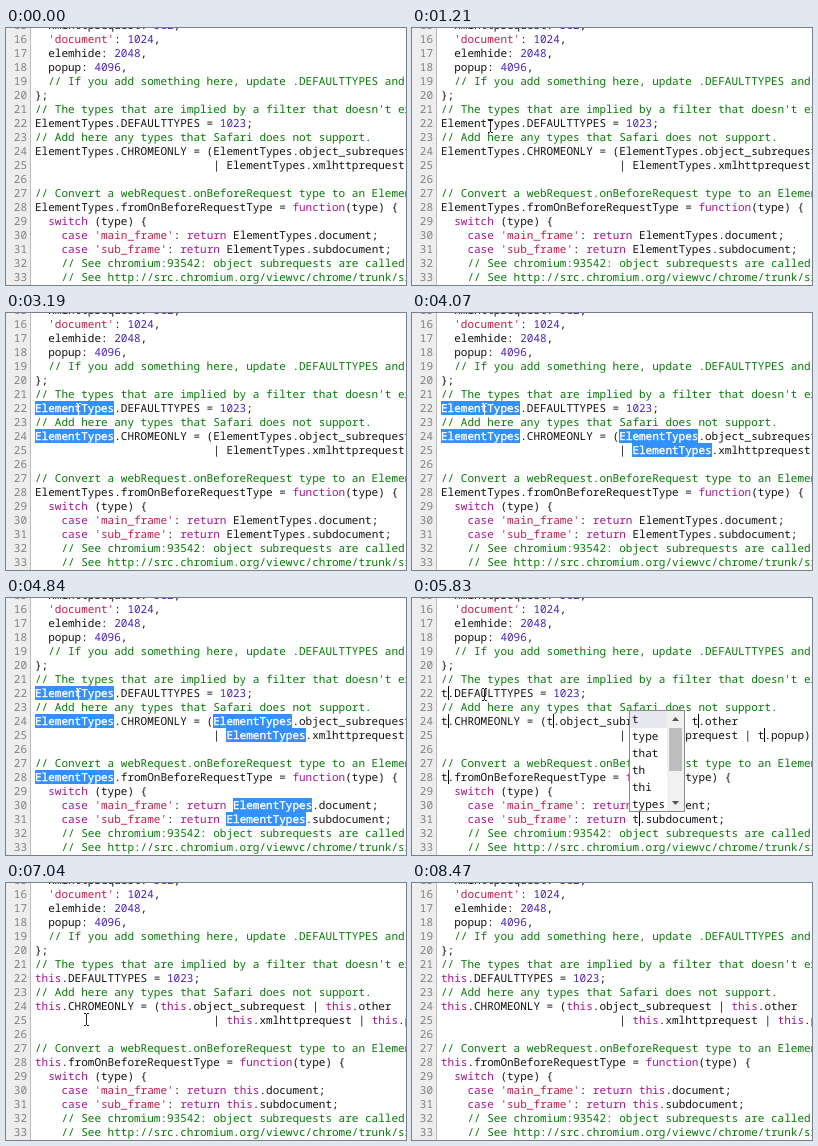
An HTML page that plays this animation: 400 by 257 pixels, repeating every 8580 ms.

```html
<!DOCTYPE html>
<html lang="en">
<head>
<meta charset="utf-8">
<title>Multiple selection in a code editor</title>
<style>
  html, body { margin: 0; width: 100%; height: 100%; overflow: hidden; background: #fff; }
  #stage {
    position: absolute; left: 0; top: 0; width: 400px; height: 257px; overflow: hidden;
    font: 11px/14px "Noto Sans Mono", "DejaVu Sans Mono", monospace;
    font-variant-ligatures: none; text-rendering: geometricPrecision;
    white-space: pre; color: #111;
  }
  #gutter {
    position: absolute; left: 0; top: -9px; width: 21px; height: 270px; padding-right: 3px;
    background: #eee; border-right: 1px solid #bbb; color: #808080; text-align: right;
  }
  #code { position: absolute; left: 29px; top: -9px; }
  #code div { height: 14px; }
  .comment { color: #067806; }
  .string { color: #c01c48; }
  .number { color: #4a22b4; }
  .keyword { color: #a31590; }
  /* Marks start one pixel above the text line */
  .sel, .box, .caret { display: inline-block; margin-top: -1px; vertical-align: top; }
  .sel, .box { height: 13px; padding-top: 1px; }
  .sel { background: #3390ff; color: #fff; -webkit-text-stroke: .35px #fff; }
  .box { box-shadow: inset 0 0 0 1px #6c6c6c; border-radius: 3px; }
  .caret { width: 0; height: 14px; border-left: 1px solid #000; margin-right: -1px; }
  #popup {
    position: absolute; left: 217px; top: 112px; width: 54px; height: 100px;
    border: 1px solid #8a8a8a; background: #fff; line-height: 17px; overflow: hidden;
  }
  #popup div { height: 17px; padding-left: 2px; }
  #popup div:first-child { background: #e6e8ee; }
  #popup svg { position: absolute; right: 0; top: 0; }
  #mouse { position: absolute; left: 0; top: 0; fill: none; }
</style>
</head>
<body>
<div id="stage">
  <div id="gutter"></div>
  <div id="code"></div>
  <div id="popup"><svg width="17" height="100">
    <path fill="#f1f1f1" d="M0 0h17v100H0z"/>
    <path fill="#bdbdbd" d="M2 17h13v43H2z"/>
    <path fill="#555" d="M5 10l3.5-4 3.5 4zM5 90l3.5 4 3.5-4z"/>
  </svg></div>
  <svg id="mouse" width="5" height="13"><path d="M0 .5h2m1 0h2M2.5 1v11M0 12.5h2m1 0h2"/></svg>
</div>
<script>
const LOOP = 8580;
const NAME = 'ElementTypes';
const FIRST_LINE = 15;

// "@" stands for each occurrence of the renamed identifier
const source = [
  "  xmlhttprequest: 512,",
  "  'document': 1024,",
  "  elemhide: 2048,",
  "  popup: 4096,",
  "  // If you add something here, update .DEFAULTTYPES and .CHROMEONLY",
  "};",
  "// The types that are implied by a filter that doesn't explicitly",
  "@.DEFAULTTYPES = 1023;",
  "// Add here any types that Safari does not support.",
  "@.CHROMEONLY = (@.object_subrequest | @.other",
  " ".repeat(27) + "| @.xmlhttprequest | @.popup);",
  "",
  "// Convert a webRequest.onBeforeRequest type to an ElementType.",
  "@.fromOnBeforeRequestType = function(type) {",
  "  switch (type) {",
  "    case 'main_frame': return @.document;",
  "    case 'sub_frame': return @.subdocument;",
  "    // See chromium:93542: object subrequests are called 'object'",
  "    // See http://src.chromium.org/viewvc/chrome/trunk/src/"
];

// Each step holds until the next one begins
const edits = [
  { at: 0 },
  { at: 1650, click: true },
  { at: 1870, selected: 1, boxes: true },
  { at: 3190, selected: 2 },
  { at: 3630, selected: 3 },
  { at: 4070, selected: 5 },
  { at: 4400, selected: 7 },
  { at: 4510, selected: 8 },
  { at: 4840, selected: 9 },
  { at: 5830, word: 't', caret: true, popup: true },
  { at: 5940, word: 'th', caret: true },
  { at: 6050, word: 'thi', caret: true },
  { at: 6270, word: 'this', caret: true },
  { at: 6710, word: 'this' },
  { at: 7260, word: 'this', caret: true },
  { at: 7700, word: 'this' },
  { at: 8140, word: 'this', caret: true },
  { at: 8470, word: 'this' }
];

const pointer = [
  { at: 0 },
  { at: 990, x: 87, y: 96 },
  { at: 1100, x: 82, y: 94 },
  { at: 1210, x: 76, y: 92 },
  { at: 1320, x: 70, y: 90 },
  { at: 7040, x: 78, y: 130 },
  { at: 7150, x: 86, y: 186 },
  { at: 7260, x: 93, y: 242 },
  { at: 7370 }
];

const $ = id => document.getElementById(id);
const span = (cls, text = '') => `<span class="${cls}">${text}</span>`;
const stepAt = (steps, t) => steps.findLast(s => s.at <= t);
const caret = span('caret');

const token = /(\/\/.*)|('[^']*')|\b(\d+)\b|\b(function|switch|case|return)\b|@/g;
const kinds = ['comment', 'string', 'number', 'keyword'];

function occurrence(index, s) {
  if (s.word) {
    const text = s.word === 'this' ? span('keyword', s.word) : s.word;
    return text + (s.caret ? caret : '');
  }
  if (index < s.selected) return span('sel', NAME);
  if (s.boxes) return span('box', NAME);
  if (s.click && index === 0) return NAME.slice(0, 6) + caret + NAME.slice(6);
  return NAME;
}

function drawCode(s) {
  let index = 0;
  $('code').innerHTML = source.map(line => '<div>' + line.replace(token, (text, ...groups) => {
    const kind = kinds.find((_, i) => groups[i] !== undefined);
    return kind ? span(kind, text) : occurrence(index++, s);
  }) + '</div>').join('');
  $('popup').style.display = s.popup ? 'block' : 'none';
  $('mouse').style.stroke = s.selected ? '#fff' : '#222';
}

function drawPointer(p) {
  $('mouse').style.display = 'x' in p ? 'block' : 'none';
  if ('x' in p) $('mouse').style.transform = `translate(${p.x}px, ${p.y}px)`;
}

$('gutter').textContent = source.map((_, i) => FIRST_LINE + i).join('\n');
$('popup').insertAdjacentHTML('afterbegin',
  ['t', 'type', 'that', 'th', 'thi', 'types'].map(w => `<div>${w}</div>`).join(''));

let shown;
const start = performance.now();

function tick() {
  const t = (performance.now() - start) % LOOP;
  const edit = stepAt(edits, t);
  if (edit !== shown) drawCode(shown = edit);
  drawPointer(stepAt(pointer, t));
  requestAnimationFrame(tick);
}
tick();
</script>
</body>
</html>
```
